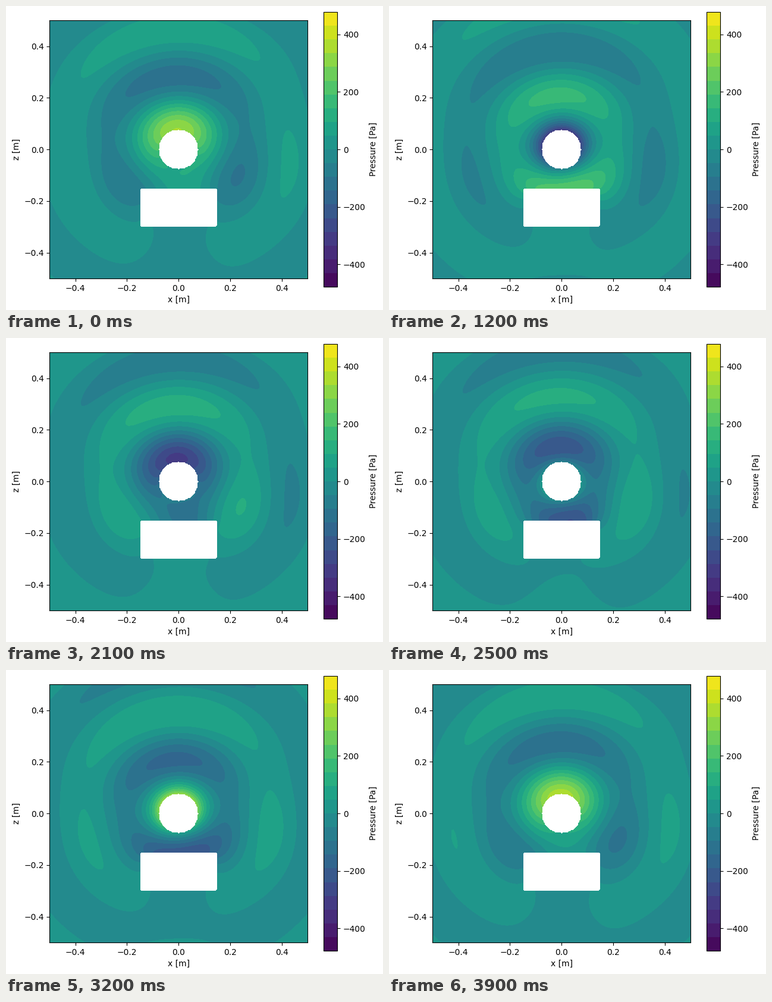
A matplotlib script that plays this animation: 634 px wide and 511 px high, repeating every 4000 ms.

```python
"""Sound radiated by a pulsating sphere above a rigid box, in the plane y = 0."""
import numpy as np
import matplotlib.pyplot as plt
from matplotlib.animation import FuncAnimation

W, H, DPI = 634, 511, 100
FRAMES, INTERVAL = 40, 100

# Acoustics
FREQ, C, RHO = 1000.0, 343.0, 1.21
OMEGA = 2 * np.pi * FREQ
K = OMEGA / C
RADIUS = 0.075
BOX_HALF = np.array([0.15, 0.15, 0.075])
BOX_CENTRE = np.array([0.0, 0.0, -0.225])
ROCKING = 0.1 * np.exp(1.2j)  # slight tilt motion of the box lid

P_MAX = 478.5
LEVELS = np.linspace(-P_MAX, P_MAX, 21)


def sphere_points(n, radius):
    """Evenly spread points on a sphere, with outward normals."""
    i = np.arange(n) + 0.5
    z = 1 - 2 * i / n
    phi = np.pi * (1 + 5 ** 0.5) * i
    s = np.sqrt(1 - z * z)
    normals = np.column_stack([s * np.cos(phi), s * np.sin(phi), z])
    return radius * normals, normals


def box_points(half, step):
    """Cell-centred points on the six faces of the box, with normals."""
    points, normals = [], []
    for axis in range(3):
        a, b = [j for j in range(3) if j != axis]
        na, nb = (int(round(2 * half[j] / step)) for j in (a, b))
        u, v = np.meshgrid(half[a] * (2 * np.arange(na) + 1 - na) / na,
                           half[b] * (2 * np.arange(nb) + 1 - nb) / nb)
        for sign in (-1, 1):
            face = np.zeros((u.size, 3))
            face[:, a], face[:, b] = u.ravel(), v.ravel()
            face[:, axis] = sign * half[axis]
            normal = np.zeros_like(face)
            normal[:, axis] = sign
            points.append(face + BOX_CENTRE)
            normals.append(normal)
    return np.vstack(points), np.vstack(normals)


def green(points, sources):
    d = points[:, None, :] - sources[None, :, :]
    r = np.sqrt((d * d).sum(axis=2))
    return np.exp(1j * K * r) / r, d, r


def solve_sources():
    """Strengths of inner point sources that meet the surface velocities."""
    sources = np.vstack([sphere_points(100, 0.045)[0],
                         box_points(BOX_HALF - 0.025, 0.02)[0]])
    ball, ball_n = sphere_points(320, RADIUS)
    box, box_n = box_points(BOX_HALF, 0.0125)
    points, normals = np.vstack([ball, box]), np.vstack([ball_n, box_n])

    lid = box_n[:, 2] > 0.5
    velocity = np.concatenate([np.ones(len(ball)),
                               ROCKING * lid * box[:, 0] / BOX_HALF[0]])
    g, d, r = green(points, sources)
    slope = g * (1j * K - 1 / r) * np.einsum("ijk,ik->ij", d, normals) / r
    strength = np.linalg.lstsq(slope, 1j * OMEGA * RHO * velocity,
                               rcond=1e-7)[0]
    return sources, strength


def pressure_field(axis):
    sources, strength = solve_sources()
    field = np.empty((axis.size, axis.size), complex)
    for i, z in enumerate(axis):
        row = np.column_stack([axis, np.zeros_like(axis),
                               np.full_like(axis, z)])
        field[i] = green(row, sources)[0] @ strength
    return field


grid = np.linspace(-0.5, 0.5, 201)
X, Z = np.meshgrid(grid, grid)
EPS = 1e-6
solid = np.hypot(X, Z) <= RADIUS + EPS
solid |= (np.abs(X) < 0.15 - EPS) & (np.abs(Z + 0.225) < 0.075 - EPS)
field = pressure_field(grid)

fig = plt.figure(figsize=(W / DPI, H / DPI), dpi=DPI)


def axes_px(left, top, width, height):
    return fig.add_axes([left / W, 1 - (top + height) / H,
                         width / W, height / H])


ax = axes_px(73.3, 24.2, 433.8, 433.8)
cax = axes_px(534.2, 10, 23.1, 462)


def draw_field(n):
    p = (field * np.exp(-2j * np.pi * n / FRAMES)).real
    p = np.ma.array(np.clip(p, -0.999 * P_MAX, 0.999 * P_MAX), mask=solid)
    return ax.contourf(X, Z, p, levels=LEVELS, cmap="viridis",
                       vmin=-P_MAX, vmax=P_MAX)


contours = draw_field(0)
fig.colorbar(contours, cax=cax, label="Pressure [Pa]",
             ticks=[-400, -200, 0, 200, 400])
ax.set(xlim=(-0.5, 0.5), ylim=(-0.5, 0.5), xlabel="x [m]", ylabel="z [m]")
ticks = [-0.4, -0.2, 0.0, 0.2, 0.4]
ax.set_xticks(ticks)
ax.set_yticks(ticks)


def update(n):
    global contours
    contours.remove()
    contours = draw_field(n)
    return [contours]


anim = FuncAnimation(fig, update, frames=FRAMES, interval=INTERVAL,
                     init_func=lambda: [], repeat=True, repeat_delay=0,
                     blit=False)
plt.show()
```
